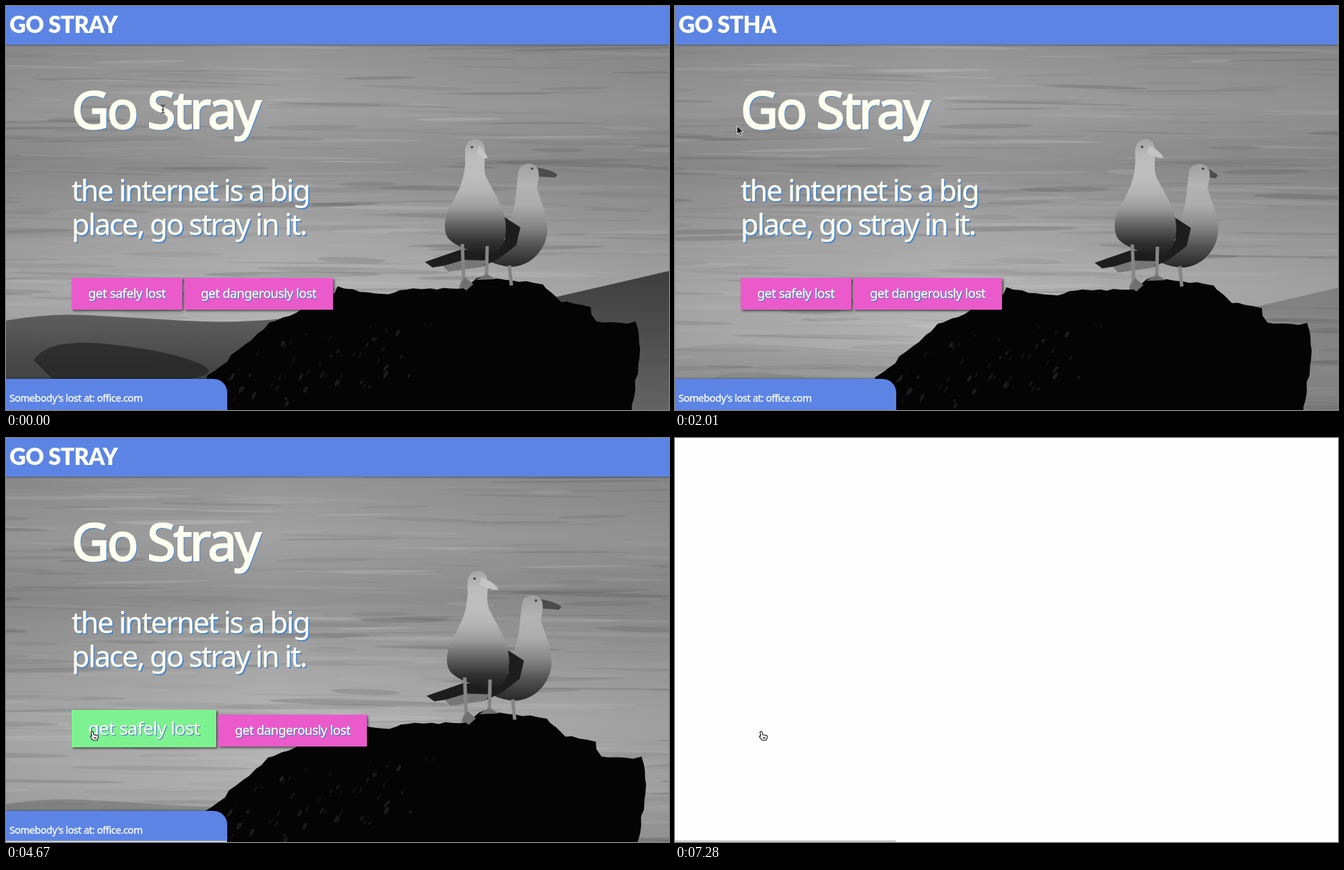
Recreate the animation shown at these times as an HTML page with a canvas. Size 959x584 px, loop 8000 ms.

```html
<!DOCTYPE html>
<html lang="en">
<head>
<meta charset="utf-8">
<title>Go Stray</title>
<style>
html, body { margin: 0; width: 100%; height: 100%; overflow: hidden; background: #fdfdfd; }
#stage { position: relative; width: 959px; height: 584px; overflow: hidden; }
#stage > *, #page > *, .t { position: absolute; }
#page { inset: 0; font-family: "Noto Sans", "Open Sans", sans-serif; color: #fffff0; letter-spacing: -.03em; -webkit-text-stroke: .018em #fffff0; }
canvas { left: 0; top: 0; }
/* --b is the baseline of the text */
.t { line-height: 0; white-space: pre; top: calc(var(--b) * 1px - .388em); }
header { left: 0; top: 0; width: 959px; height: 56px; background: #5b84e5; box-shadow: 0 1px 2px rgba(0,0,0,.4); }
#brand { left: 5px; --b: 39; font: 900 33px/0 Lato, sans-serif; letter-spacing: -.02em; -webkit-text-stroke: 0; }
.big { left: 95px; text-shadow: 2px 2px 0 #4a86c8; letter-spacing: -.045em; }
#title { font-size: 75px; --b: 177; -webkit-text-stroke-width: .03em; }
.sub { font-size: 42px; }
#row { left: 95px; top: 393px; display: flex; align-items: baseline; gap: 3px; }
.btn { position: relative; padding: 11.6px 24px 13.6px; font-size: 18.4px; line-height: 1.125; white-space: pre; background: #ea5acb; box-shadow: 2px 2px 3px rgba(0,0,0,.55); text-shadow: 1px 1px 1px #3f78c0, 1px 1px 0 #4a86c8; }
.over { font-size: 26px; background: #7cf390; }
.busy { padding-left: 57px; }
#ring { position: absolute; left: 24px; top: 14px; width: 26px; height: 26px; overflow: visible; filter: drop-shadow(1px 1px 0 #4a86c8); }
footer { left: 0; top: 539px; width: 320px; height: 45px; background: #5b84e5; border-radius: 0 20px 0 0; box-shadow: 1px 0 3px rgba(0,0,0,.6); }
footer .t { left: 5px; --b: 33; font-size: 14.5px; }
#status { left: 0; top: 582px; width: 320px; height: 2px; background: #e4e4e4; border-top: 1px solid #aaa; border-radius: 0 3px 0 0; box-sizing: border-box; }
#cursor { left: 0; top: 0; width: 20px; height: 24px; overflow: visible; }
</style>
</head>
<body>
<div id="stage">
  <div id="page">
    <canvas id="sea" width="959" height="584"></canvas>
    <header><div id="brand" class="t">GO STRAY</div></header>
    <div id="title" class="t big">Go Stray</div>
    <div class="t big sub" style="--b:282">the internet is a big</div>
    <div class="t big sub" style="--b:331">place, go stray in it.</div>
    <div id="row">
      <div id="safe" class="btn"><span id="label">get safely lost</span><svg id="ring" viewBox="-13 -13 26 26"><path d="M-3 -11A11.4 11.4 0 1 0 3 -11" fill="none" stroke="#fffff0" stroke-width="3.2"/></svg></div>
      <div class="btn">get dangerously lost</div>
    </div>
    <footer><div class="t">Somebody's lost at: office.com</div></footer>
  </div>
  <div id="status"></div>
  <svg id="cursor">
    <path id="beam" d="M-3 -6Q0 -6 0 -4Q0 -6 3 -6M0 -4V4M-3 6Q0 6 0 4Q0 6 3 6M-2 1H2" fill="none" stroke="#111"/>
    <path id="arrow" d="M0 0V12L3 9.5L5 14L7 13L5 8.8H9Z" fill="#000" stroke="#fff" stroke-width=".9"/>
    <path id="hand" d="M-2 1Q-1 -1 1 1L2 5L8 6Q9 7 8 10L7 13H1L-3 8Q-3 6 -1 7Z M3 8V11M5 8V11" fill="#fff" stroke="#111" stroke-width="1.1"/>
  </svg>
</div>
<script>
const LOOP = 8000, STEP = 177, HOVER = 4340, CLICK = 5490, BLANK = 7270;
const $ = id => document.getElementById(id);
const g = $("sea").getContext("2d");
const clamp = v => Math.min(1, Math.max(0, v));
const bell = (t, mid, width) => Math.exp(-(((t - mid) / width) ** 2));
const wave = (t, period) => Math.cos(2 * Math.PI * t / period);
const grey = (v, a = 1) => `rgba(${v},${v},${v},${a})`;

function random(seed) {
  return () => (seed = (seed * 16807) % 2147483647) / 2147483647;
}
const rnd = random(41);

const streaks = Array.from({ length: 380 }, () => {
  const near = rnd();
  return { x: rnd() * 1100 - 70, y: 58 + near * 526, w: 30 + rnd() * 110, h: 1 + rnd() * (2 + near * 2.5),
    tone: rnd() > .55 ? 215 : 75, a: .08 + rnd() * .17, p: rnd() * 6.3, tilt: (rnd() - .4) * .06 };
});

// Left edge of the rock's texture climbs to the right
const specks = Array.from({ length: 60 }, () => {
  const x = 315 + rnd() * 300;
  return { x, y: Math.max(455, 535 - (x - 300) * .55) + rnd() * 100, w: .6 + rnd() * 2, h: 2 + rnd() * 4, tone: 14 + rnd() * 18 | 0 };
});

// Corners of the rock; the edges between them are roughened
const corners = [[276, 600], [292, 536], [380, 459], [470, 421], [480, 405], [545, 418], [580, 409], [655, 409],
  [690, 391], [775, 401], [802, 426], [845, 435], [852, 455], [910, 458], [919, 495], [902, 600]];
const rock = corners.slice(1).flatMap(([x, y], i) => {
  const [px, py] = corners[i], n = Math.ceil(Math.hypot(x - px, y - py) / 12);
  return Array.from({ length: n }, (_, j) =>
    [px + (x - px) * j / n + rnd() * 4 - 2, py + (y - py) * j / n + rnd() * 4 - 2]);
});

function shade(y0, y1, ...tones) {
  const s = g.createLinearGradient(0, y0, 0, y1);
  tones.forEach((v, i) => s.addColorStop(i / (tones.length - 1), grey(v)));
  return s;
}

function fill(d, style, alpha = 1) {
  g.globalAlpha = alpha;
  g.fillStyle = style;
  g.fill(new Path2D(d));
  g.globalAlpha = 1;
}

function oval(x, y, w, h, tilt, style) {
  g.fillStyle = style;
  g.beginPath();
  g.ellipse(x, y, w, h, tilt, 0, 7);
  g.fill();
}

function water(t) {
  fill("M-20 40H980V600H-20Z", shade(56, 584, 148, 162, 146, 166, 180, 178, 158));
  for (const s of streaks) {
    const a = s.a * (.65 + .35 * Math.sin(t * .0018 + s.p));
    oval(s.x + t * .004, s.y + 2 * Math.sin(t * .001 + s.p), s.w, s.h, s.tilt, grey(s.tone, a));
  }
  const side = g.createLinearGradient(0, 0, 959, 0);
  side.addColorStop(0, grey(40, .12));
  side.addColorStop(.4, grey(40, 0));
  side.addColorStop(1, grey(40, .15));
  fill("M-20 40H980V600H-20Z", side);
}

// Dark swells: a first pair sinks away, a later one rises on the left
function swells(t) {
  const late = t > 3500;
  const left = late ? 517 - (t - 4670) * .02 : 447 + t * .02;
  const deep = late ? .4 * clamp((t - 4200) / 500) : .9 * bell(t, 0, 1400);
  const right = 382 + t * .011;
  fill(`M-20 ${left + 12}Q50 ${left - 4} 120 ${left}T260 ${left + 8}T400 ${left + 5}V600H-20Z`, shade(left, 584, 85, 62, 50), deep);
  fill(`M40 ${left + 65}Q60 ${left + 32} 150 ${left + 42}T280 ${left + 70}T240 ${left + 95}H70Z`, "#161616", deep * .6);
  fill(`M780 ${right + 42}Q860 ${right + 24} 980 ${right - 4}V600H780Z`, shade(right, 584, 45, 65, 92), .85 * bell(t, 0, 1900));
}

function rearGull(t) {
  const call = bell(t, 2900, 500);
  const x = 756 + 8 * call, y = 238 + 7 * call;
  const bx = 790 + 8 * wave(t, 4400) + 20 * call, by = 244 + 22 * call;
  fill(`M${x + 8} ${y - 5}Q${bx - 10} ${by - 8} ${bx} ${by}L${bx - 4} ${by + 4}L${x + 8} ${y + 8}Z`, "#4c4c4c");
  fill(`M${x - 15} ${y + 2}C${x - 13} ${y - 13} ${x + 11} ${y - 14} ${x + 14} ${y}C${x + 16} ${y + 8} ${x + 13} ${y + 16} 768 264
    C775 285 784 305 783 325C782 350 760 378 728 377C708 374 690 368 702 360C725 346 728 318 732 300C738 285 738 262 ${x - 15} ${y + 2}Z`,
    shade(228, 378, 160, 180, 172, 135, 80, 38));
  fill("M617 378L606 370L658 352L705 355L722 338L719 304L744 320L738 346L712 366L690 376L655 372Z", "#1d1d1d");
  fill("M632 376L662 367L695 368L690 377L640 384Z", "#777");
  oval(x + 5, y - 3, 1.8, 1.8, 0, "#444");
}

function frontGull(t) {
  const bx = 703 - 6 * wave(t, 2700) + t / 1200, by = 220;
  fill("M664 212C663 188 690 188 692 204C694 222 690 233 694 246C703 266 722 290 723 318C724 345 712 362 692 364C668 350 640 346 636 328C632 310 640 292 648 280C657 262 666 245 664 212Z",
    shade(193, 366, 165, 188, 190, 182, 155, 98, 48, 22));
  fill(`M684 202Q${bx - 4} ${by - 10} ${bx} ${by}L${bx - 7} ${by}L681 213Z`, "#c4c4c4");
  oval(674, 204, 1.8, 1.8, 0, "#444");
}

function legs() {
  g.strokeStyle = "#858585";
  g.lineWidth = 5;
  g.stroke(new Path2D("M660 344L662 395L657 408M696 347L695 391M728 375L731 404"));
  fill("M656 405L664 392L676 402L666 411Z M680 396L695 387L708 395Z", "#707070");
}

function scene(t) {
  const z = 1 + .027 * t / 6180;
  g.setTransform(z, 0, 0, z, 490 * (1 - z), 240 * (1 - z));
  water(t);
  swells(t);
  fill("M" + rock.join("L") + "Z", "#040404");
  for (const s of specks) oval(s.x, s.y, s.w, s.h, .5, grey(s.tone));
  rearGull(t);
  frontGull(t);
  legs();
}

// Header letters settle one by one behind a short run of stray ones
function brand(t) {
  const name = "GO STRAY", strays = "XBCRTWENKQDHAVUM";
  if (t < 230) return name;
  const i = Math.floor((t - 478) / 305) + 1;
  return name.slice(0, Math.max(0, i - 1)) + strays.slice(Math.max(0, 2 * i - 1), 2 * i + 1);
}

function button(t) {
  const busy = t >= CLICK;
  $("safe").classList.toggle("over", t >= HOVER);
  $("safe").classList.toggle("busy", busy);
  $("label").textContent = busy ? "losing you" : "get safely lost";
  $("ring").style.display = busy ? "" : "none";
  $("ring").style.transform = `rotate(${180 + (t - 6180) * .18}deg)`;
}

// Stops of the pointer: time, x, y
const stops = [[0, 227, 149], [420, 133, 20], [1250, 130, 18], [2010, 89, 176], [2900, 39, 306], [4350, 125, 424]];
function pointer(t) {
  const i = Math.max(1, stops.findIndex(s => s[0] > t)), last = stops.at(-1);
  const [a, b] = t >= last[0] ? [last, last] : [stops[i - 1], stops[i]];
  const k = clamp((t - a[0]) / (b[0] - a[0] || 1));
  const kind = t >= HOVER ? "hand" : t < 50 ? "beam" : "arrow";
  $("cursor").style.transform = `translate(${a[1] + (b[1] - a[1]) * k}px,${a[2] + (b[2] - a[2]) * k}px)`;
  for (const id of ["beam", "arrow", "hand"]) $(id).style.display = id === kind ? "" : "none";
}

function draw(t) {
  const held = t < 50 ? 0 : 50 + STEP * Math.floor((t - 50) / STEP);
  const blank = t >= BLANK;
  $("page").style.display = blank ? "none" : "";
  $("status").style.display = t >= HOVER ? "" : "none";
  pointer(held);
  if (blank) return;
  scene(held);
  $("brand").textContent = brand(t);
  button(t);
}

const start = performance.now();
function tick() {
  draw((performance.now() - start) % LOOP);
  requestAnimationFrame(tick);
}
tick();
</script>
</body>
</html>
```
